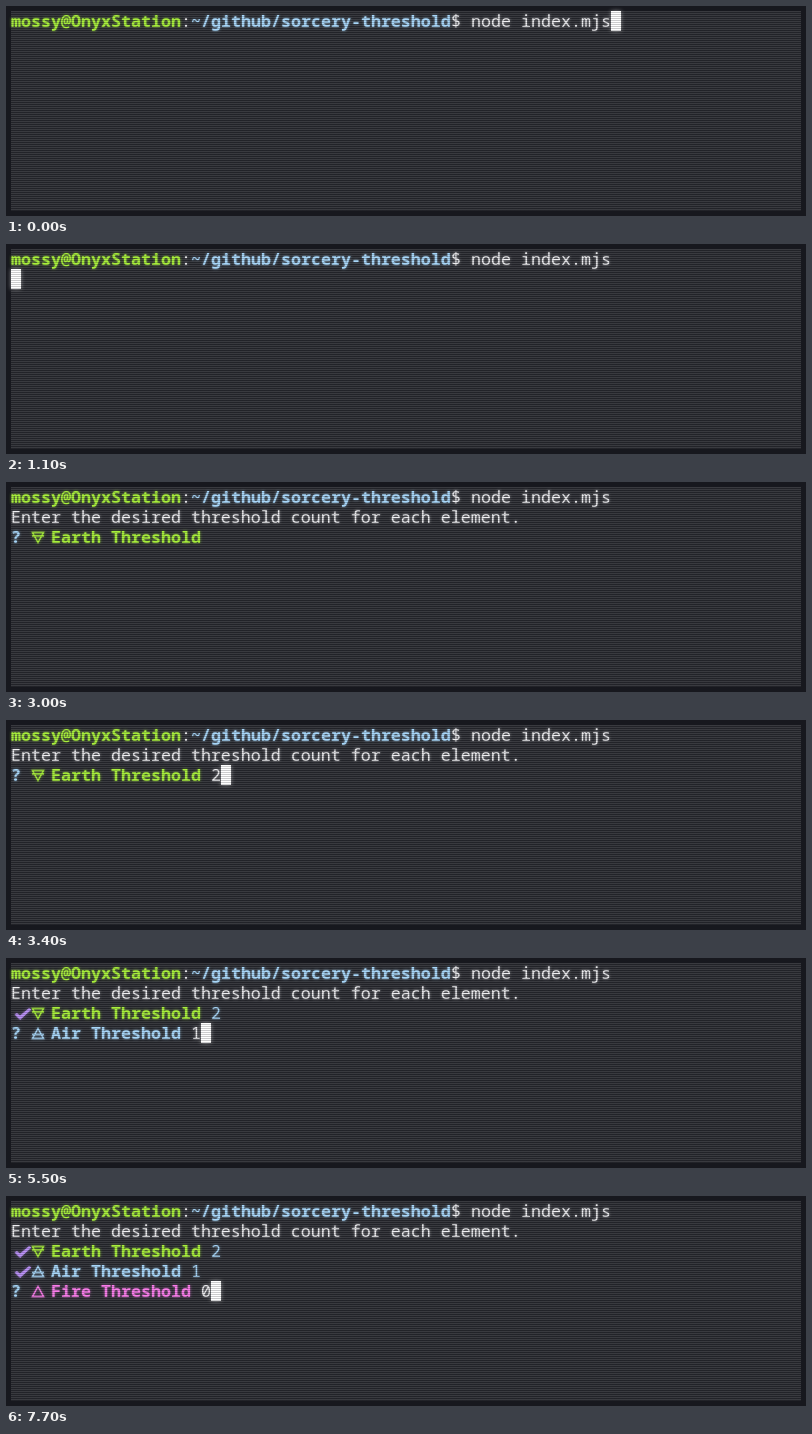
Write an HTML page that moves like this. It is 800 px wide and 210 px high and loops after 8000 ms.

```html
<!DOCTYPE html>
<html lang="en">
<head>
<meta charset="utf-8">
<title>Terminal session</title>
<style>
  html, body { margin: 0; width: 100%; height: 100%; overflow: hidden; background: #17181e; }
  #screen { position: absolute; left: 0; top: 0; width: 800px; height: 210px; overflow: hidden; }
  #screen::before, #screen::after { content: ""; position: absolute; inset: 5px; }
  #screen::before { background: repeating-linear-gradient(#393a3f 0 1px, #25262b 1px 2px); }
  #screen::after { background: repeating-linear-gradient(transparent 0 1px, #17181e38 1px 2px); }
  .run, .cursor, svg { position: absolute; }
  .run {
    font: 500 16.667px/20px "Noto Sans Mono", "DejaVu Sans Mono", monospace;
    font-variant-ligatures: none;
    white-space: pre;
    text-shadow: 0 0 3px color-mix(in srgb, currentColor 60%, transparent);
  }
  .bold { font-weight: 650; }
  svg { overflow: visible; fill: none; stroke: currentColor; stroke-width: 1.5;
        filter: drop-shadow(0 0 1.5px color-mix(in srgb, currentColor 55%, transparent)); }
  .cursor { width: 10px; height: 20px; background: #fff; box-shadow: 0 0 4px #ffffff80; }
</style>
</head>
<body>
<div id="screen"></div>
<script>
const LOOP = 8000, CELL = 10, ROW = 20, PAD = 5;
const WHITE = '#efeff1', GREEN = '#a9f03c', BLUE = '#a9d8fa', PINK = '#fb7deb', PURPLE = '#bd93f9';
const ICONS = {
  earth: 'M1.5 5.5H12.5L7 15.5ZM1 9H13',
  air: 'M1.5 15.5H12.5L7 5.5ZM1 11.5H13',
  fire: 'M1.5 15.5H12.5L7 5.5Z',
  check: 'M4 11.5L6 10.5L9 13L18 5.5L20 6.5L9 16.5Z'
};
const screen = document.getElementById('screen');
const parts = [];

function place(el, col, row, from, to = LOOP) {
  el.style.left = PAD + col * CELL + 'px';
  el.style.top = PAD + row * ROW + 'px';
  screen.append(el);
  parts.push({ el, from, to });
}

function text(str, col, row, color, from = 0, to = LOOP, bold = false) {
  const el = document.createElement('span');
  el.className = bold ? 'run bold' : 'run';
  el.textContent = str;
  el.style.color = color;
  place(el, col, row, from, to);
}

function icon(name, col, row, color, from) {
  const el = document.createElementNS('http://www.w3.org/2000/svg', 'svg');
  const path = document.createElementNS(el.namespaceURI, 'path');
  el.setAttribute('width', 20);
  el.setAttribute('height', 20);
  path.setAttribute('d', ICONS[name]);
  if (name === 'check') path.setAttribute('fill', color);
  el.style.color = color;
  if (name === 'check') el.style.strokeWidth = 0.8;
  el.append(path);
  place(el, col, row, from);
}

// One question: asked, then answered by a digit, then confirmed.
function question(name, row, color, asked, typed, done, digit) {
  const label = name[0].toUpperCase() + name.slice(1) + ' Threshold';
  const answerCol = 5 + label.length;
  text('?', 0, row, BLUE, asked, done, true);
  icon(name, 2, row, color, asked);
  text(label, 4, row, color, asked, LOOP, true);
  text(digit, answerCol, row, WHITE, typed, done);
  if (done < LOOP) {
    icon('check', 0, row, PURPLE, done);
    text(digit, answerCol, row, BLUE, done);
  }
}

text('mossy@OnyxStation', 0, 0, GREEN, 0, LOOP, true);
text(':', 17, 0, WHITE);
text('~/github/sorcery-threshold', 18, 0, BLUE, 0, LOOP, true);
text('$ node index.mjs', 44, 0, WHITE);
text('Enter the desired threshold count for each element.', 0, 1, WHITE, 1200);
question('earth', 2, GREEN, 1200, 3400, 3900, '2');
question('air', 3, BLUE, 4000, 5500, 6000, '1');
question('fire', 4, PINK, 6000, 7700, LOOP, '0');

// Cursor: [from, to, column, row]
[
  [0, 200, 60, 0], [700, 1100, 60, 0], [1100, 1200, 0, 1],
  [1200, 1700, 20, 2], [2200, 2700, 20, 2], [3300, 3400, 20, 2], [3400, 3900, 21, 2],
  [3900, 4000, 0, 3], [4000, 4500, 18, 3], [5000, 5500, 18, 3], [5500, 6000, 19, 3],
  [6000, 6600, 19, 4], [7200, 7700, 19, 4], [7700, LOOP, 20, 4]
].forEach(([from, to, col, row]) => {
  const el = document.createElement('div');
  el.className = 'cursor';
  place(el, col, row, from, to);
});

const start = performance.now();
function draw(now) {
  const t = Math.max(0, now - start) % LOOP;
  for (const { el, from, to } of parts) {
    el.style.visibility = t >= from && t < to ? 'visible' : 'hidden';
  }
  requestAnimationFrame(draw);
}
draw(start);
</script>
</body>
</html>
```
